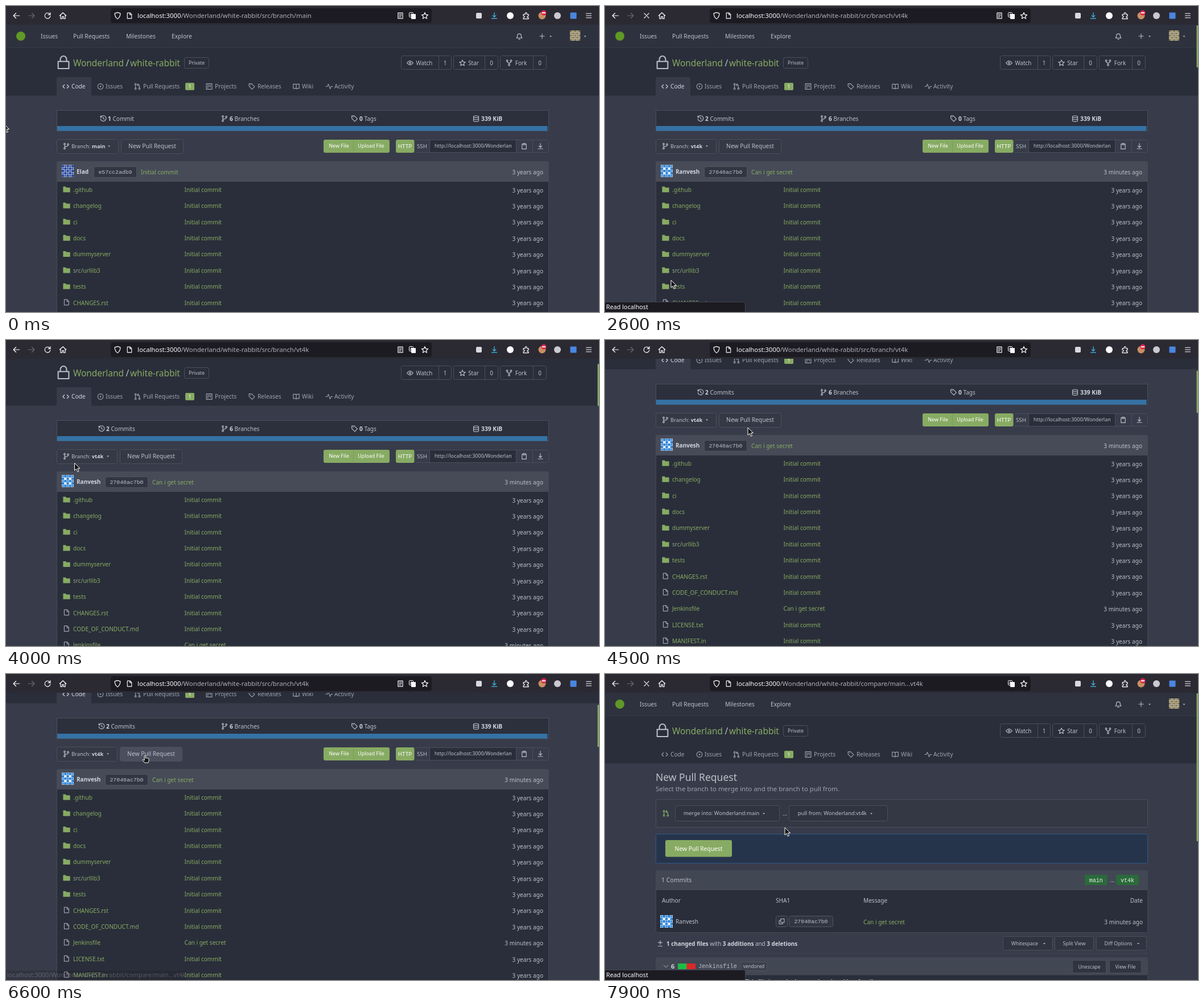
An HTML page that plays this animation: 1042 by 538 pixels, repeating every 8 s.

```html
<!DOCTYPE html>
<html lang="en">
<head>
<meta charset="utf-8">
<title>Repository browser</title>
<style>
html, body { margin: 0; width: 100%; height: 100%; overflow: hidden; background: #383c4a; }
svg { display: block; width: 1042px; height: 538px; }
text { font-family: 'Noto Sans', sans-serif; fill: #bbc0ca; white-space: pre; }
.b { font-weight: 600; fill: #d0d5de; }
.m { font-family: 'Liberation Mono', monospace; }
</style>
</head>
<body>
<svg id="stage" viewBox="0 0 1042 538" xmlns="http://www.w3.org/2000/svg"></svg>
<script>
const GREEN = '#87ab63', TEXT = '#bbc0ca', DIM = '#9ba2b0', DARK = '#2a2e3a', BODY = '#383c4a',
  HEAD = '#464b57', LINE = '#4a4f5c', HOVER = '#3b3f4c', LIGHT = '#fbfbfe';
const BRANCH = 'vt4k', HOST = 'localhost:3000', REPO = '/Wonderland/white-rabbit';
const ROW_TOP = 309, ROW_H = 28.4;

const dot = (x, y, r = 1.8) => `M${x} ${y - r}a${r} ${r} 0 1 0 .01 0`;
const ICONS = {
  code: 'M5 4L1 8l4 4M11 4l4 4-4 4',
  issue: dot(8, 8, 6.5) + dot(8, 8, 1),
  pr: dot(3.5, 3) + dot(3.5, 13) + dot(12.5, 13) + 'M3.5 5v6M12.5 11V6q0-2-2-2H8M10 1.5L7.5 4 10 6.5',
  branch: dot(4, 3) + dot(4, 13) + dot(12, 4) + 'M4 5v6M12 6q0 3-8 3',
  project: 'M1.5 1.5h13v13h-13zM5 4.5v7M8 4.5v3M11 4.5v5',
  tag: 'M1.5 1.5h6l7 7-6 6-7-7zM4.6 4.7h.8',
  book: 'M1 2.5h4q3 0 3 2 0-2 3-2h4v10h-4q-3 0-3 1.5 0-1.5-3-1.5H1zM8 4.5V14',
  pulse: 'M0 8h3.5L6 2.5l4 11L12.5 8H16',
  eye: 'M.8 8Q8-1.5 15.2 8 8 17.5.8 8' + dot(8, 8, 2),
  star: 'M8 1.2l2 4.6 5 .4-3.8 3.3 1.2 4.9L8 11.8l-4.4 2.6 1.2-4.9L1 6.2l5-.4z',
  fork: dot(3.5, 3) + dot(12.5, 3) + dot(8, 13) + 'M3.5 5q0 3 4.5 3t4.5-3M8 8v3',
  history: 'M2 5a6.5 6.5 0 1 1-.5 3M1.5 1.5V5H5M8 4.5V8l2.5 1.5',
  db: 'M2 3.5c0-3 12-3 12 0s-12 3-12 0v9c0 3 12 3 12 0v-9M2 8c0 3 12 3 12 0',
  clip: 'M5 3H3v11.5h10V3h-2M5.5 1.5h5v3h-5z',
  copy: 'M5.5 1.5h9v9h-9zM5 5.5H1.5v9h9V11',
  down: 'M8 1.5v9M4.5 7.5L8 11l3.5-3.5M2.5 14h11',
  file: 'M3 1.5h6.5L13 5v9.5H3zM9 2v4h4',
  lock: 'M2 7h12v8H2zM4.5 7V4.5a3.5 3.5 0 0 1 7 0V7',
  bell: 'M2 12q2-2 2-5a4 4 0 0 1 8 0q0 3 2 5zM6.5 14.5h3',
  plus: 'M8 2v12M2 8h12',
  back: 'M15 8H2M7.5 2.5L2 8l5.5 5.5',
  next: 'M1 8h13M8.5 2.5L14 8l-5.5 5.5',
  reload: 'M13.6 6A6 6 0 1 0 14 8.6M14 1.5V6H9.5',
  close: 'M3 3l10 10M13 3L3 13',
  home: 'M1 8l7-6.5L15 8M3 7v7.5h3.5V10h3v4.5H13V7',
  shield: 'M8 1l6 2q0 8-6 12-6-4-6-12z',
  reader: 'M2.5 1.5h11v13h-11zM5 5h6M5 8h6M5 11h4',
  puzzle: 'M2 5h4V3a1.7 1.7 0 0 1 3.4 0v2H13v4h-1a1.7 1.7 0 0 0 0 3.4h1V15H2v-3h1a1.7 1.7 0 0 0 0-3.4H2z',
  menu: 'M2 3h12M2 8h12M2 13h12',
  filter: 'M1 4h14M3.5 8h9M6 12h4',
  chevron: 'M2 5l6 6 6-6',
  diff: 'M8 1v9M3.5 5.5h9M3.5 14h9'
};
const FILLED = { folder: 'M1 2.5h5l1.5 2H15V14H1z', caret: 'M4 6h8l-4 4.5z' };

const rect = (x, y, w, h, fill, stroke = 'none', r = 0, extra = '') =>
  `<rect x="${x}" y="${y}" width="${w}" height="${h}" rx="${r}" fill="${fill}" stroke="${stroke}" ${extra}/>`;
const box = (x, y, w, h, fill = 'none', stroke = LINE, r = 3, extra = '') =>
  rect(x + .5, y + .5, w - 1, h - 1, fill, stroke, r, extra);
const circle = (x, y, r, fill) => `<circle cx="${x}" cy="${y}" r="${r}" fill="${fill}"/>`;

// Text placed by its left, middle or right edge and its optical centre line, on a whole-pixel baseline.
function text(x, cy, s, { size = 10.1, fill, anchor = 'start', cls = '', id = '' } = {}) {
  const style = `font-size:${size}px${fill ? `;fill:${fill}` : ''}`;
  return `<text ${id && `id="${id}"`} class="${cls}" x="${x}" y="${Math.round(cy + size * .36)}" text-anchor="${anchor}" style="${style}">${s}</text>`;
}
const mid = (x, cy, s, o) => text(x, cy, s, { anchor: 'middle', ...o });
const end = (x, cy, s, o) => text(x, cy, s, { anchor: 'end', ...o });
const bold = s => `<tspan class="b">${s}</tspan>`;

function icon(name, cx, cy, size = 12, color = TEXT, weight = 1.5) {
  const paint = FILLED[name] ? `fill="${color}"`
    : `fill="none" stroke="${color}" stroke-width="${weight}" stroke-linecap="round" stroke-linejoin="round"`;
  return `<path d="${FILLED[name] || ICONS[name]}" transform="translate(${cx - size / 2} ${cy - size / 2}) scale(${size / 16})" ${paint}/>`;
}

// Symmetric tile avatar.
function avatar(x, y, s, color, twist) {
  const c = s / 5;
  let d = '';
  for (let i = 0; i < 5; i++) for (let j = 0; j < 5; j++) {
    const a = Math.abs(i - 2), b = Math.abs(j - 2), px = x + i * c, py = y + j * c;
    if ((a + b + twist) % 2) d += `M${px} ${py}h${c}v${c}h${-c}z`;
    else if (a * b !== 1) d += `M${px + c / 2} ${py}l${c / 2} ${c / 2}l${-c / 2} ${c / 2}l${-c / 2} ${-c / 2}z`;
  }
  return rect(x, y, s, s, '#f3f5f8') + `<path d="${d}" fill="${color}"/>`;
}
const badge = (x, y, w, s) => box(x, y, w, 20, '#323642', '#50555f') +
  mid(x + w / 2, y + 9.5, s, { size: 9.85, cls: 'm' });

function toolbar() {
  const light = (n, x, s = 13) => icon(n, x, 17, s, LIGHT);
  return rect(0, 0, 1042, 33, '#2b2a33') + rect(184, 4, 564, 26, '#1c1b22', 'none', 4) +
    light('back', 18) + icon('next', 45, 17, 13, '#6b6a73') +
    `<g id="reload">${light('reload', 73)}</g><g id="stop">${light('close', 73)}</g>` + light('home', 100) +
    light('shield', 196) + light('file', 217, 12) + text(231, 17, '', { size: 11.28, fill: '#b0b0b8', id: 'url' }) +
    `<g id="reader">${light('reader', 693, 12)}</g>` +
    box(708, 11, 8, 9, 'none', LIGHT, 1) + rect(712, 14, 8, 9, LIGHT, 'none', 1) +
    mid(712, 15.5, 'A', { size: 7, fill: LIGHT }) + light('star', 736) +
    rect(826, 12, 10, 10, '#d8d8de', 'none', 2) + icon('down', 858, 17, 13, '#45c1ee') + circle(886, 17, 6, LIGHT) +
    light('puzzle', 914) + circle(942, 17, 6.5, '#c98f62') + circle(945, 12, 4.5, '#e22850') + rect(942, 11, 6, 2, LIGHT) +
    circle(969, 17, 6, '#c9c9cf') + rect(991.5, 11.5, 11, 11, '#4a86e0', 'none', 1) + light('menu', 1024, 12);
}

function siteHeader(codeTab) {
  const nav = [[61, 'Issues'], [118, 'Pull Requests'], [211, 'Milestones'], [291, 'Explore']];
  const counters = [['eye', 694, 89, 66, 'Watch', 1], ['star', 786, 79, 55, 'Star', 0], ['fork', 868, 82, 58, 'Fork', 0]];
  const tabs = [['code', 105, 115, 'Code'], ['issue', 166, 175, 'Issues'], ['pr', 231, 241, 'Pull Requests'],
    ['project', 357, 367, 'Projects'], ['tag', 432, 442, 'Releases'], ['book', 510, 520, 'Wiki'], ['pulse', 568, 577, 'Activity']];
  return rect(0, 33, 1042, 41, '#2e323e') + rect(0, 74, 1042, 83.5, DARK) + rect(0, 73, 1042, 1, '#313c47') +
    circle(26, 53, 8, '#609926') + nav.map(([x, s]) => text(x, 53, s, { size: 10.2 })).join('') +
    icon('bell', 902, 53, 13) + icon('plus', 942, 53, 11) + icon('caret', 957, 53.5, 8) +
    avatar(991, 43, 18, '#85794f', 1) + icon('caret', 1017.5, 53.5, 8) +
    icon('lock', 101, 99, 25, TEXT, 1.3) + text(118, 100, 'Wonderland', { size: 15.4, fill: GREEN }) +
    text(210.5, 100, '/', { size: 15.4 }) + text(218, 100, 'white-rabbit', { size: 15.4, fill: GREEN }) +
    box(313, 90, 44, 20) + mid(335, 100, 'Private', { size: 8.6 }) +
    counters.map(([n, x, w, split, s, k]) => box(x, 87, w, 25) + rect(x + split, 87, 1, 25, LINE) +
      icon(n, x + 16, 100) + mid(x + split / 2 + 8, 100, s, { size: 9.9 }) + mid(x + (split + w) / 2, 100, k, { size: 9.9 })).join('') +
    (codeTab ? `<path d="M89 158v-30q0-3 3-3h55q3 0 3 3v30z" fill="${BODY}"/>` : rect(0, 157, 1042, 1, '#343845')) +
    tabs.map(([n, ix, x, s], i) => {
      const c = codeTab && !i ? '#d0d5de' : DIM;
      return icon(n, ix, 141.5, 12, c) + text(x, 141.5, s, { size: 10.2, fill: c });
    }).join('') + rect(315, 135, 16, 13, GREEN, 'none', 2) + mid(323, 141.5, '1', { size: 8.5, fill: '#fff' });
}

const FILES = ['.github', 'changelog', 'ci', 'docs', 'dummyserver', 'src/urllib3', 'tests', 'CHANGES.rst',
  'CODE_OF_CONDUCT.md', 'Jenkinsfile', 'LICENSE.txt', 'MANIFEST.in'];
const fileY = i => ROW_TOP + (i + .5) * ROW_H;

function repoPage(r) {
  const p = r.id, bw = r.buttonWidth, prX = 89 + bw + 4;
  const rows = FILES.map((name, i) => {
    const y = fileY(i), fresh = r.secret && name === 'Jenkinsfile';
    return icon(i < 7 ? 'folder' : 'file', 106.5, y - 1, i < 7 ? 14 : 12, i < 7 ? GREEN : TEXT, 1.3) +
      text(118, y, name.replace('src/', '<tspan fill="#93a18b">src/</tspan>'), { fill: GREEN, id: p + i }) +
      text(313.5, y, fresh ? r.message : 'Initial commit', { fill: GREEN }) +
      end(944, y + .8, fresh ? r.age : '3 years ago');
  }).join('');
  return siteHeader(true) + box(89, 183, 865, 37, '#2c303c', LINE, 0) + rect(90, 211, 861.5, 8.5, '#3572a5') +
    icon('history', r.secret ? 168 : 171, 198) + text(r.secret ? 176 : 179, 198, r.commits) +
    icon('branch', 384, 198) + text(393, 198, bold('6') + ' Branches') +
    icon('tag', 612.5, 198) + text(621, 198, bold('0') + ' Tags') +
    icon('db', 826, 198) + text(835, 198, bold('339 KiB'), { size: 10.3 }) +
    box(89, 234, bw, 26, '#353946') + icon('branch', 106, 246.5) +
    text(115, 246.5, 'Branch: ' + bold(r.branch), { size: 9.3 }) + icon('caret', 89 + bw - 17, 246.5, 8) +
    box(prX, 234, 110, 26, '#353946', LINE, 3, `id="${p}pr"`) + mid(prX + 55, 246.5, 'New Pull Request', { size: 10.25 }) +
    rect(558, 235, 116, 23, GREEN, 'none', 3) + rect(610, 235, 1, 23, '#7a9c58') +
    mid(585, 246, 'New File', { size: 9, fill: '#fff' }) + mid(641.5, 246, 'Upload File', { size: 8.9, fill: '#fff' }) +
    box(717, 235, 237, 23, DARK) + rect(717, 236, 27, 21, BODY) + rect(897, 236, 56, 21, BODY) +
    rect(685, 235, 32.5, 23, GREEN, 'none', 3) + [744, 896, 925].map(x => rect(x, 235, 1, 23, LINE)).join('') +
    mid(701, 246.5, 'HTTP', { size: 9.8, fill: '#fff' }) + mid(731, 246.5, 'SSH', { size: 9.8 }) +
    `<g clip-path="url(#field)">${text(753, 246, 'http://' + HOST + REPO, { size: 8.9 })}</g>` +
    icon('clip', 910.5, 246.5) + icon('down', 939, 246.5) +
    box(89, 273, 865, 500, DARK, '#444955') + `<path d="M89 309v-33q0-3 3-3h859q3 0 3 3v33z" fill="${HEAD}"/>` +
    rect(90, 0, 863, ROW_H, HOVER, 'none', 0, `id="${p}hover"`) +
    avatar(98, 279.5, 21, r.color, r.twist) + text(124, 291, bold(r.author), { size: 10 }) +
    badge(r.shaX, 282, 76, r.sha) + text(r.shaX + 83, 292, r.message, { fill: GREEN }) + end(944, 292, r.age) + rows;
}

const ITEMS = ['main', ...[1, 2, 3, 4].map(n => 'thefelix-patch-' + n), BRANCH];
const ITEM_H = 27.65, itemY = i => 350 + i * ITEM_H;
const dropdown = () => box(89, 262, 201, 241, DARK, LINE, 2) +
  rect(90, 336, 199, ITEM_H, HOVER) + rect(90, 0, 199, ITEM_H, HOVER, 'none', 0, 'id="item"') +
  box(98, 273, 183, 27, '#2e323e', GREEN) + rect(109, 279, 1, 14, TEXT) +
  text(109, 286, 'Filter branch or tag...', { size: 10.2, fill: '#7f8699' }) + icon('filter', 267, 286, 13) +
  icon('branch', 108, 319.5) + text(117, 319.5, 'BRANCHES', { size: 8.35 }) +
  icon('tag', 206, 319.5, 12, GREEN) + text(215, 319.5, 'TAGS', { size: 8.4, fill: GREEN }) +
  ITEMS.map((s, i) => text(102, itemY(i), s, { size: 10.35 })).join('');

function comparePage(r) {
  // Button; inset is the distance from its right edge to the caret.
  const pick = (x, y, w, h, s, size, inset = 0) => box(x, y, w, h, '#303440') +
    mid(x + w / 2 - inset * .37, y + h / 2, s, { size }) + (inset ? icon('caret', x + w - inset, y + h / 2 + .5, 8) : '');
  const label = (x, w, s) => rect(x, 353, w, 18, '#2b6a3a', 'none', 3) + mid(x + w / 2, 362, s, { size: 10, fill: '#e6f0e6', cls: 'm' });
  const heads = [[100, 'Author'], [300, 'SHA1'], [454, 'Message']];
  return siteHeader(false) + text(89, 182, 'New Pull Request', { size: 17.5 }) +
    text(89, 202, 'Select the branch to merge into and the branch to pull from.', { size: 11.45, fill: DIM }) +
    box(89, 220, 865, 50, '#343845', LINE, 2) + icon('pr', 107, 245, 12, GREEN) +
    pick(123, 231, 184, 28, 'merge into: Wonderland:main', 9.45, 28) + mid(316, 245, '...') +
    pick(323, 231, 174, 28, 'pull from: Wonderland:' + BRANCH, 9.45, 29) +
    box(89, 281, 865, 52, '#26344b', '#2f5787', 2) + rect(106, 292, 117, 29.5, GREEN, 'none', 3) +
    mid(164.5, 307, 'New Pull Request', { size: 10.25, fill: '#fff' }) +
    box(89, 345, 865, 110, DARK, '#444955') + `<path d="M89 380v-32q0-3 3-3h859q3 0 3 3v32z" fill="#424754"/>` +
    text(99, 362, '1 Commits', { size: 10.6 }) + label(843, 39.5, 'main') + mid(891.5, 362, '...') + label(898, 40, BRANCH) +
    heads.map(([x, s]) => text(x, 398, s)).join('') + end(945, 398, 'Date') +
    avatar(97, 424, 22, r.color, r.twist) + text(124, 435, r.author) +
    box(300, 425, 21, 20, '#2f333f', '#50555f') + icon('copy', 310.5, 435, 11) + badge(323, 425, 78, r.sha) +
    text(454, 436, r.message, { fill: GREEN }) + end(945, 436, r.age) +
    icon('diff', 97, 474, 12) + text(108, 474, `${bold('1 changed files')} with ${bold('3 additions')} and ${bold('3 deletions')}`, { size: 9.9 }) +
    pick(699, 461, 88, 25, 'Whitespace', 8.7, 15) + pick(790, 461, 69, 25, 'Split View', 8.9) + pick(863, 461, 89, 25, 'Diff Options', 8.7, 15) +
    rect(89, 491, 865, 1, '#424754') + box(89, 498, 865, 60, DARK, '#444955') + rect(89.5, 498.5, 864, 31, '#424754', 'none', 3) +
    icon('chevron', 107, 514, 10) + text(116, 514, bold('6'), { size: 11 }) + rect(128, 509, 16, 10, '#21ba45') + rect(143.5, 509, 15.5, 10, '#db2828') +
    text(164, 513, 'Jenkinsfile', { size: 10.3, cls: 'm' }) + box(238, 506, 47, 16, '#3c404d', '#50555f') + mid(261.5, 514, 'vendored', { size: 8.4 }) +
    pick(821, 503, 60, 23, 'Unescape', 8.5) + pick(886, 503, 57, 23, 'View File', 8.9) +
    mid(367, 541.5, bold('This file is marked as vendored and has few lines'), { size: 10 });
}

const first = { id: 'a', branch: 'main', buttonWidth: 109, commits: bold('1') + ' Commit', author: 'Elad', sha: 'e57cc2adb9',
  shaX: 154, message: 'Initial commit', age: '3 years ago', color: '#2c4a9c', twist: 1 };
const second = { id: 'b', branch: BRANCH, buttonWidth: 107, commits: bold('2') + ' Commits', author: 'Ranvesh', sha: '27040ac7b0',
  shaX: 174, message: 'Can i get secret', age: '3 minutes ago', color: '#2f86d8', twist: 0, secret: true };

const stage = document.getElementById('stage');
stage.innerHTML = `<defs><clipPath id="field"><rect x="750" y="236" width="138" height="21"/></clipPath></defs>` +
  rect(0, 0, 1042, 538, BODY) + `<g id="pageA">${repoPage(first)}</g><g id="pageB">${repoPage(second)}</g>` +
  `<g id="pageC">${comparePage(second)}</g><g id="menu">${dropdown()}</g>` +
  rect(1039.5, 34, 3, 74, GREEN, 'none', 1.2, 'id="thumb"') + toolbar() +
  `<g id="status">${box(-2, 520, 300, 20, '#1c1b22', '#42414d', 3, 'id="bubble"')}${text(2, 529.5, '', { size: 10.8, fill: LIGHT, id: 'note' })}</g>` +
  `<g id="cursor"><path id="arrow" d="M0 0v13.2l3.1-2.9 2.2 5 2.2-1-2.2-4.8h4.2z" fill="#111" stroke="#fff"/>` +
  `<path id="hand" d="M-.8 1q1.3-1.4 2.2 0v4q1-.8 1.9.1 1-.7 1.8.2 1.3-.5 1.9.5v3.7l-1.2 3.5h-6.2L-4 8.5q0-1.6 1.6-1L-.8 9z" fill="#111" stroke="#fff"/></g>`;

const $ = Object.fromEntries([...stage.querySelectorAll('[id]')].map(e => [e.id, e]));
const show = (e, on) => { e.style.display = on ? '' : 'none'; };

const LOOP = 8000, SWAP = 2400, COMPARE = 7000;
const PATH = [[100, -4, 207], [500, 20, 290], [900, 30, 285], [1300, 140, 246], [1450, 142, 247], [1800, 114, 471], [1900, 116, 482],
  [3000, 116, 482], [3500, 49, 250.5], [3700, 49, 250.5], [4450, 251, 154], [4600, 251, 154], [5000, 200, 300],
  [5250, 150, 416], [5400, 91, 415], [5550, 105, 440], [5900, 160, 470], [6450, 244, 143], [7100, 244, 143], [7900, 316, 270]];
const clamp = v => Math.min(1, Math.max(0, v));
const smooth = v => { v = clamp(v); return v * v * (3 - 2 * v); };

function pointer(t) {
  const i = PATH.findIndex(k => k[0] > t);
  if (i === 0) return PATH[0].slice(1);
  if (i < 0) return PATH.at(-1).slice(1);
  const [t0, x0, y0] = PATH[i - 1], [t1, x1, y1] = PATH[i], k = smooth((t - t0) / (t1 - t0));
  return [x0 + (x1 - x0) * k, y0 + (y1 - y0) * k];
}

function render(t) {
  const [x, y] = pointer(t), onB = t >= SWAP && t < COMPARE, onC = t >= COMPARE;
  const scroll = onB ? Math.round(106 * smooth((t - 3850) / 350)) : 0;
  const menuOpen = t >= 1400 && t < SWAP, loading = (t >= 2200 && t < 3200) || t >= 6800;
  show($.pageA, t < SWAP); show($.pageB, onB); show($.pageC, onC); show($.menu, menuOpen);
  $.pageB.setAttribute('transform', `translate(0 ${-scroll})`);

  show($.thumb, t >= 200);
  $.thumb.setAttribute('y', 34 + scroll * .19);
  $.thumb.setAttribute('height', onC ? 260 : 74);

  const tail = onC ? `/compare/main...${BRANCH}` : `/src/branch/${onB ? BRANCH : 'main'}`;
  $.url.innerHTML = `<tspan style="fill:${LIGHT}">${HOST}</tspan>${REPO + tail}`;
  show($.reload, !loading); show($.stop, loading); show($.reader, !onC);

  const item = Math.floor((y - itemY(0)) / ITEM_H + .5);
  show($.item, menuOpen && item >= 0);
  $.item.setAttribute('y', itemY(item) - ITEM_H / 2);

  const row = Math.floor((y + scroll - ROW_TOP) / ROW_H), onRow = onB && t >= 4600 && row >= 0 && x > 89;
  show($.ahover, false); show($.bhover, onRow);
  $.bhover.setAttribute('y', Math.round(ROW_TOP + row * ROW_H));
  let link = -1;
  FILES.forEach((_, i) => {
    const e = $['b' + i];
    if (onRow && i === row && x < 118 + e.getComputedTextLength()) link = i;
    e.style.textDecoration = link === i ? 'underline' : 'none';
  });

  const onButton = onB && x > 200 && x < 310 && y + scroll > 234 && y + scroll < 260 && t > 6200;
  $.bpr.setAttribute('fill', onButton ? '#4b4f5d' : '#353946');

  let note = '', alpha = 1, least = 0;
  if ((t >= 2500 && t < 3200) || t >= 7050) { note = 'Read localhost'; least = 247; }
  else if (link >= 0) note = `${HOST}${REPO}/src/branch/${BRANCH}/${FILES[link]}`;
  else if (t >= 6550 && onB) { note = `${HOST}${REPO}/compare/main...${BRANCH}`; alpha = clamp((t - 6550) / 250); }
  show($.status, note);
  if (note) {
    $.note.textContent = note;
    $.status.setAttribute('opacity', alpha);
    $.bubble.setAttribute('width', Math.max(least, Math.round($.note.getComputedTextLength()) + 4) + 1);
  }

  const hand = (t >= 1250 && t < 2500) || onButton || (link >= 0 && x > 110);
  show($.hand, hand); show($.arrow, !hand);
  $.cursor.setAttribute('transform', `translate(${x} ${y})`);
}

const start = performance.now();
function frame() {
  render((performance.now() - start) % LOOP);
  requestAnimationFrame(frame);
}
frame();
</script>
</body>
</html>
```
